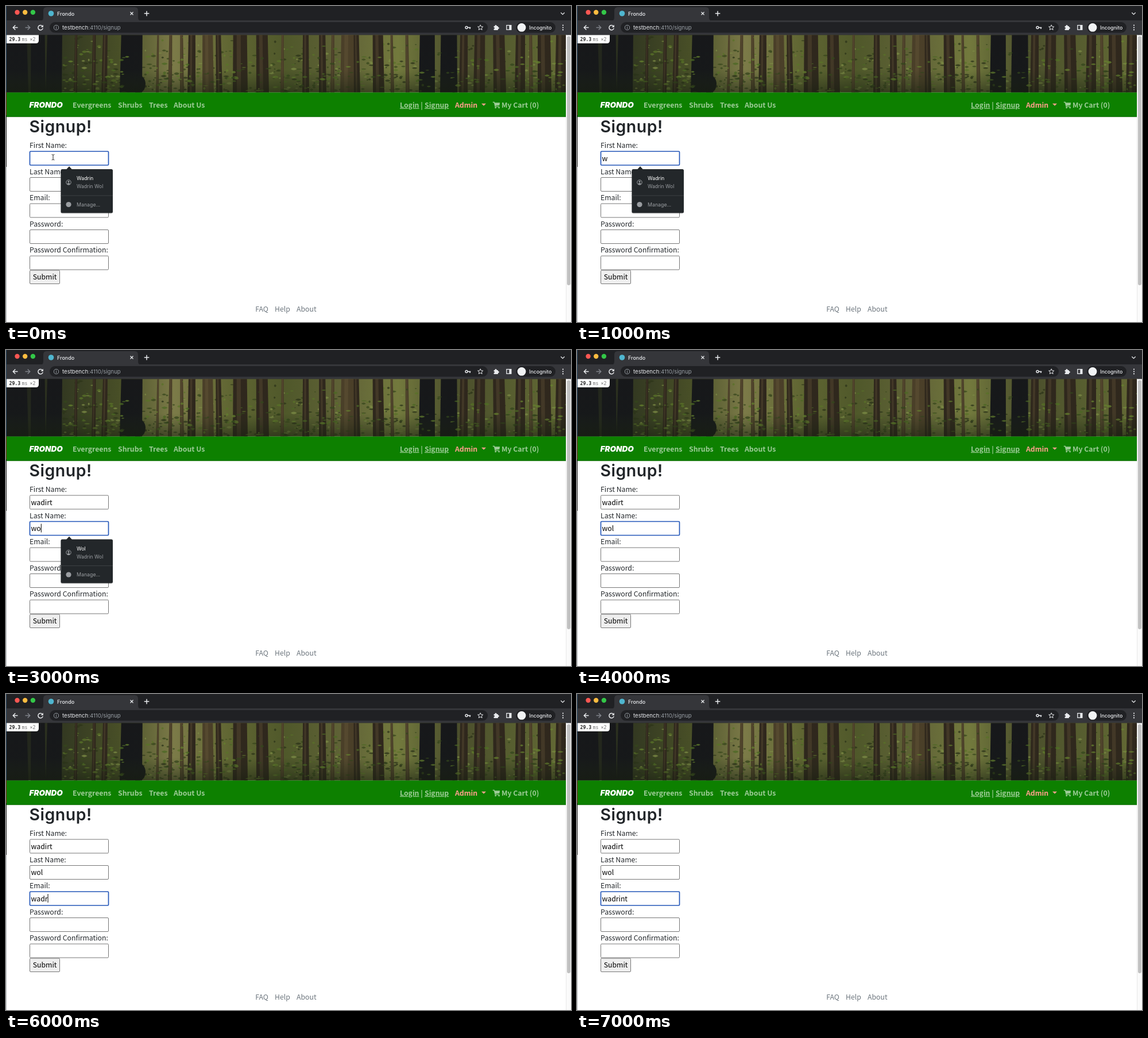
These frames come from a looping animation (984 by 550 pixels, 8 s). An HTML page:

```html
<!DOCTYPE html>
<html lang="en">
<head>
<meta charset="utf-8">
<title>Signup form</title>
<style>
html, body { margin: 0; width: 100%; height: 100%; overflow: hidden; background: #fff; }
svg { display: block; width: 984px; height: 550px; }
text { white-space: pre; }
.ui { font-family: Inter, Roboto, sans-serif; }
.page { font-family: "Noto Sans CJK JP", "Noto Sans CJK SC", "Noto Sans CJK", "Open Sans", sans-serif; font-size: 12.25px; }
.mono { font-family: "DejaVu Sans Mono", monospace; font-size: 8.2px; }
.bold { font-weight: 700; }
</style>
</head>
<body>
<svg id="stage" viewBox="0 0 984 550" xmlns="http://www.w3.org/2000/svg"></svg>
<script>
const stage = document.getElementById('stage');
const PITCH = 45.5;

const rect = (x, y, w, h, fill, more = '') =>
  `<rect x="${x}" y="${y}" width="${w}" height="${h}" fill="${fill}" ${more}/>`;
const circle = (x, y, r, fill, more = '') =>
  `<circle cx="${x}" cy="${y}" r="${r}" fill="${fill}" ${more}/>`;
const text = (x, y, str, cls, fill, more = '') =>
  `<text x="${x}" y="${y}" class="${cls}" fill="${fill}" ${more}>${str}</text>`;
const line = (d, stroke, w = 1.4, more = '') =>
  `<path d="${d}" fill="none" stroke="${stroke}" stroke-width="${w}" ${more}/>`;
const shape = (d, fill, more = '') => `<path d="${d}" fill="${fill}" ${more}/>`;
const size = n => `font-size="${n}"`;

function random(seed) {
  return () => (seed = (seed * 16807) % 2147483647) / 2147483647;
}

// Browser window
function browser() {
  const pale = '#e8eaed', grey = '#9aa0a6';
  const lights = ['#fc5753', '#fdbc40', '#33c748']
    .map((c, i) => circle(19.5 + i * 13.7, 11, 4.2, c)).join('');
  return rect(0, 0, 984, 51, '#202124') + lights +
    shape('M59 26 Q65 26 65 20 V8 Q65 2 71 2 H224 Q230 2 230 8 V20 Q230 26 236 26 Z', '#35363a') +
    rect(0, 25, 984, 25.5, '#35363a') +
    circle(78.5, 13, 4.8, '#4fb6cf') +
    text(89, 16.6, 'Frondo', 'ui', pale, size(9) + ' font-weight="500"') +
    line('M216.5 10.5 l5 5 m0 -5 l-5 5', pale, 1.3) +
    line('M245 8.8 v8.6 m-4.3 -4.3 h8.6', pale, 1.5) +
    line('M966.3 11.5 l3.2 3.2 3.2 -3.2', pale, 1.3) +
    rect(76, 28, 763, 18.6, '#202124', 'rx="9.3"') +
    line('M20.5 37.5 H12.3 m4 -4 l-4 4 4 4', pale, 1.5) +
    line('M33.5 37.5 H41.7 m-4 -4 l4 4 -4 4', '#80838a', 1.5) +
    line('M63.2 34.8 A4.2 4.2 0 1 0 64.2 38.6', pale, 1.5) +
    shape('M64.8 32.8 v4.2 h-4.2 z', pale) +
    circle(87.5, 37.5, 4.1, 'none', `stroke="${grey}" stroke-width="1"`) +
    line('M87.5 37 v2.7 M87.5 34.9 v1.1', grey, 1.1) +
    `<text x="98" y="41" class="ui" font-size="9.6" fill="${pale}">testbench<tspan fill="${grey}">:4110/signup</tspan></text>` +
    circle(802, 37.5, 2, 'none', `stroke="${pale}" stroke-width="1.4"`) +
    line('M804 37.5 h5.3 M808 37.5 v2.4', pale, 1.5) +
    shape('M826.2 32.8 l1.3 3 3.3 .3 -2.5 2.2 .8 3.2 -2.9 -1.7 -2.9 1.7 .8 -3.2 -2.5 -2.2 3.3 -.3 z', 'none',
      `stroke="${pale}" stroke-width="1"`) +
    rect(849.5, 35, 7.5, 7, pale, 'rx="1"') + circle(853, 34.6, 1.6, pale) + circle(857.2, 38.3, 1.6, pale) +
    circle(849.7, 38.5, 1.3, '#35363a') +
    rect(871.8, 33.6, 8, 7.6, 'none', `stroke="${pale}" stroke-width="1.3"`) + rect(876.3, 33.5, 3.8, 8, pale) +
    rect(888, 28, 69, 18.6, '#202124', 'rx="9.3"') +
    circle(898, 37.4, 7.4, '#f1f3f4') +
    text(911, 41, 'Incognito', 'ui', pale, size(8.8) + ' font-weight="500"') +
    [33.6, 37.5, 41.4].map(y => circle(970, y, 1.1, pale)).join('');
}

// Soft stand-in for the woodland banner
const trunks = [
  2, 36, 0, 44, 24, 0, 70, 26, 0, 119, 4, 1, 150, 5, 1, 167, 8, 1, 199, 37, 0,
  262, 3, 2, 283, 5, 2, 304, 5, 2, 317, 12, 1, 343, 18, 2, 367, 9, 1, 396, 24, 1,
  437, 20, 1, 479, 4, 2, 517, 10, 1, 546, 11, 1, 566, 5, 2, 583, 22, 2, 607, 9, 1, 640, 18, 1,
  671, 4, 2, 697, 5, 2, 720, 26, 0, 757, 28, 0, 790, 13, 1, 815, 18, 1, 850, 20, 1,
  887, 16, 1, 912, 5, 2, 927, 22, 1, 957, 17, 1
];
const barks = ['#15161a', '#30271d', '#4e412a'];

function leaves(rnd, count, colors) {
  const paths = colors.map(() => '');
  for (let i = 0; i < count; i++) {
    const x = 96 + rnd() * 878, y = 53 + Math.sqrt(rnd()) * 97;
    const w = 3 + rnd() * 8, h = 1.5 + rnd() * 3;
    paths[i % colors.length] +=
      `M${x.toFixed(1)} ${y.toFixed(1)}q${(w / 2).toFixed(1)} ${(-h).toFixed(1)} ${w.toFixed(1)} 0q${(-w / 2).toFixed(1)} ${h.toFixed(1)} ${(-w).toFixed(1)} 0`;
  }
  return paths.map((d, i) => shape(d, colors[i], 'opacity=".75"')).join('');
}

function forest() {
  const rnd = random(41);
  const tones = ['#17191a', '#343a22', '#4b5228', '#85834d', '#666c35', '#545d2c',
    '#66683a', '#7b8241', '#4e512e', '#5c6332', '#6b7038'];
  const stops = tones.map((c, i) => `<stop offset="${i * 10}%" stop-color="${c}"/>`).join('');
  let wood = '';
  for (let i = 0; i < trunks.length; i += 3) {
    const [x, w, tone] = trunks.slice(i, i + 3);
    const lean = (rnd() - .5) * 4;
    wood += shape(`M${x + lean} 50 h${w} L${x + w + 1} 151 H${x - 1} Z`, barks[tone]);
    if (tone) wood += shape(`M${x + lean + w * .25} 50 h${w * .3} L${x + w * .55} 151 h${-w * .3} Z`, '#7b6945', 'opacity=".28"');
  }
  return `<defs><linearGradient id="wood">${stops}</linearGradient>
    <linearGradient id="shade" x2="0" y2="1"><stop stop-color="#2a2a1c" stop-opacity=".1"/>
    <stop offset=".6" stop-color="#24301a" stop-opacity=".1"/><stop offset="1" stop-color="#182010" stop-opacity=".6"/></linearGradient>
    <clipPath id="banner"><rect x="1" y="50.5" width="974" height="100"/></clipPath></defs>
    <g clip-path="url(#banner)">` + rect(0, 50, 976, 101, 'url(#wood)') +
    leaves(rnd, 700, ['#3a4a1c', '#5f7a2a', '#86964a', '#2c3419']) + wood +
    shape('M228 119 q14 2 15 16 q0 13 -10 16 h-8 z', barks[0]) +
    leaves(rnd, 240, ['#4f6e24', '#6d8a30', '#36491c']) +
    rect(0, 50, 976, 101, 'url(#shade)') + '</g>';
}

function badge() {
  return shape('M0 50.5 H57 V60 Q57 65 52 65 H0 Z', '#fff') +
    text(5.5, 60.5, '29.3', 'mono bold', '#222') +
    text(27.5, 60.5, 'ms', 'mono', '#777') +
    text(41.5, 60.5, '×2', 'mono', '#777');
}

function navbar() {
  const pale = '#9dcc97', pink = '#ff9f8c';
  const item = (x, str, more) => text(x, 176.8, str, 'page bold', pale, more);
  const under = 'text-decoration="underline"';
  return rect(0, 150.5, 975, 42.5, '#0d8000') + rect(0, 192.3, 975, .9, '#0a6800') +
    text(40.5, 176.8, 'FRONDO', 'ui', '#fff', size(13.6) + ' font-weight="900" font-style="italic"') +
    item(116, 'Evergreens') + item(195, 'Shrubs') + item(249, 'Trees') + item(292, 'About Us') +
    item(686, 'Login', under) + item(722.3, '|') + item(729, 'Signup', under) +
    text(782, 176.8, 'Admin', 'page bold', pink) +
    shape('M828 169.8 h8 l-4 4 z', pink) +
    line('M847.8 167.5 h2.5 l1.8 7.6 h7.2', pale, 1.3) +
    shape('M850.6 168.3 h9.6 l-.9 4.6 -7.6 .9 z', pale) +
    circle(852.6, 177, 1.3, pale) + circle(858.6, 177, 1.3, pale) +
    item(863, 'My Cart (0)');
}

const labels = ['First Name:', 'Last Name:', 'Email:', 'Password:', 'Password Confirmation:'];

function form() {
  const ink = '#212529', muted = '#6c757d';
  const rows = labels.map((label, i) =>
    text(41, 247 + i * PITCH, label, 'page', ink) +
    `<rect class="box" x="41.5" y="${253 + i * PITCH}" width="137" height="24" rx="1.5" fill="#fff"/>` +
    `<text class="page value" x="43.6" y="${269.7 + i * PITCH}" fill="#000"></text>`).join('');
  return text(40.5, 219.5, 'Signup!', 'ui', ink, size(28.5) + ' font-weight="600" letter-spacing=".5"') + rows +
    rect(41.5, 460, 52, 23.5, '#efefef', 'rx="1.5" stroke="#767676"') +
    text(46.8, 476.4, 'Submit', 'page', '#000') +
    text(434.3, 532.3, 'FAQ', 'page', muted) +
    text(468, 532.3, 'Help', 'page', muted) +
    text(506, 532.3, 'About', 'page', muted);
}

function popup() {
  const grey = '#9a9da1', dark = '#23272a';
  return '<g id="popup">' +
    rect(95, 284.5, 91, 77, '#000', 'rx="3" opacity=".18"') +
    shape('M104.5 285 l5.5 -6 5.5 6 z', dark) +
    rect(95.5, 284, 90.5, 76.3, dark, 'rx="2.5"') +
    rect(95.5, 329.5, 90.5, 1, '#3c4043') +
    circle(109, 307, 4.2, 'none', `stroke="${grey}" stroke-width="1"`) +
    circle(109, 305.7, 1.5, grey) + shape('M106 309.8 q3 -3.4 6 0 q-3 2.2 -6 0 z', grey) +
    text(123, 303, '', 'ui', '#fff', size(8.8) + ' id="hint"') +
    text(123, 317.4, 'Wadrin Wol', 'ui', grey, size(8.6)) +
    circle(109, 345.5, 4.6, grey) +
    text(123, 348.8, 'Manage...', 'ui', grey, size(8.8)) + '</g>';
}

stage.innerHTML = rect(0, 0, 984, 550, '#fff') + browser() + forest() + badge() + navbar() + form() +
  rect(0, 0, 1, 150, '#2b4a66') + rect(0, 150, 1, 40, '#7a2b22') + rect(0, 190, 1, 90, '#222') + rect(0, 280, 1, 270, '#b9bcc0') +
  rect(975, 50.5, 9, 499.5, '#fafafa') + rect(975, 50.5, 1, 499.5, '#e8e8e8') +
  rect(977, 52.5, 6, 433.5, '#c1c1c1', 'rx="3"') +
  rect(0, 258, 1, 15, '#000', 'id="caret"') + popup() +
  '<g id="mouse">' + line('M79.7 258.5 q2 0 2.3 1.3 q.3 -1.3 2.3 -1.3 M82 259.8 v7 M79.7 268 q2 0 2.3 -1.3 q.3 1.3 2.3 1.3', '#222', 1) + '</g>';

const boxes = stage.querySelectorAll('.box');
const values = stage.querySelectorAll('.value');
const [caret, panel, hint, mouse] = ['caret', 'popup', 'hint', 'mouse'].map(id => document.getElementById(id));
const show = (el, on) => el.setAttribute('visibility', on ? 'visible' : 'hidden');

// One state per second: focused row, its typed text, caret, popup
const names = ['Wadrin', 'Wol'];
const done = ['wadirt', 'wol'];
const steps = [
  [0, '', false, true],
  [0, 'w', false, true],
  [0, 'wadirt', true, false],
  [1, 'wo', true, true],
  [1, 'wol', false, false],
  [2, 'w', true, false],
  [2, 'wadr', true, false],
  [2, 'wadrint', false, false]
];

function render(ms) {
  const n = Math.floor(ms / 1000) % steps.length;
  const [row, typed, blink, open] = steps[n];
  boxes.forEach((box, i) => {
    box.setAttribute('stroke', i === row ? '#2356b8' : '#767676');
    box.setAttribute('stroke-width', i === row ? 1.7 : 1);
    values[i].textContent = i < row ? done[i] : i === row ? typed : '';
  });
  caret.setAttribute('x', 43.6 + values[row].getComputedTextLength());
  caret.setAttribute('y', 257 + row * PITCH);
  show(caret, blink);
  show(panel, open);
  panel.setAttribute('transform', `translate(0 ${row * PITCH})`);
  hint.textContent = names[row] || '';
  show(mouse, n === 0);
}

const start = performance.now();
function tick() {
  render((performance.now() - start) % 8000);
  requestAnimationFrame(tick);
}
tick();
</script>
</body>
</html>
```
